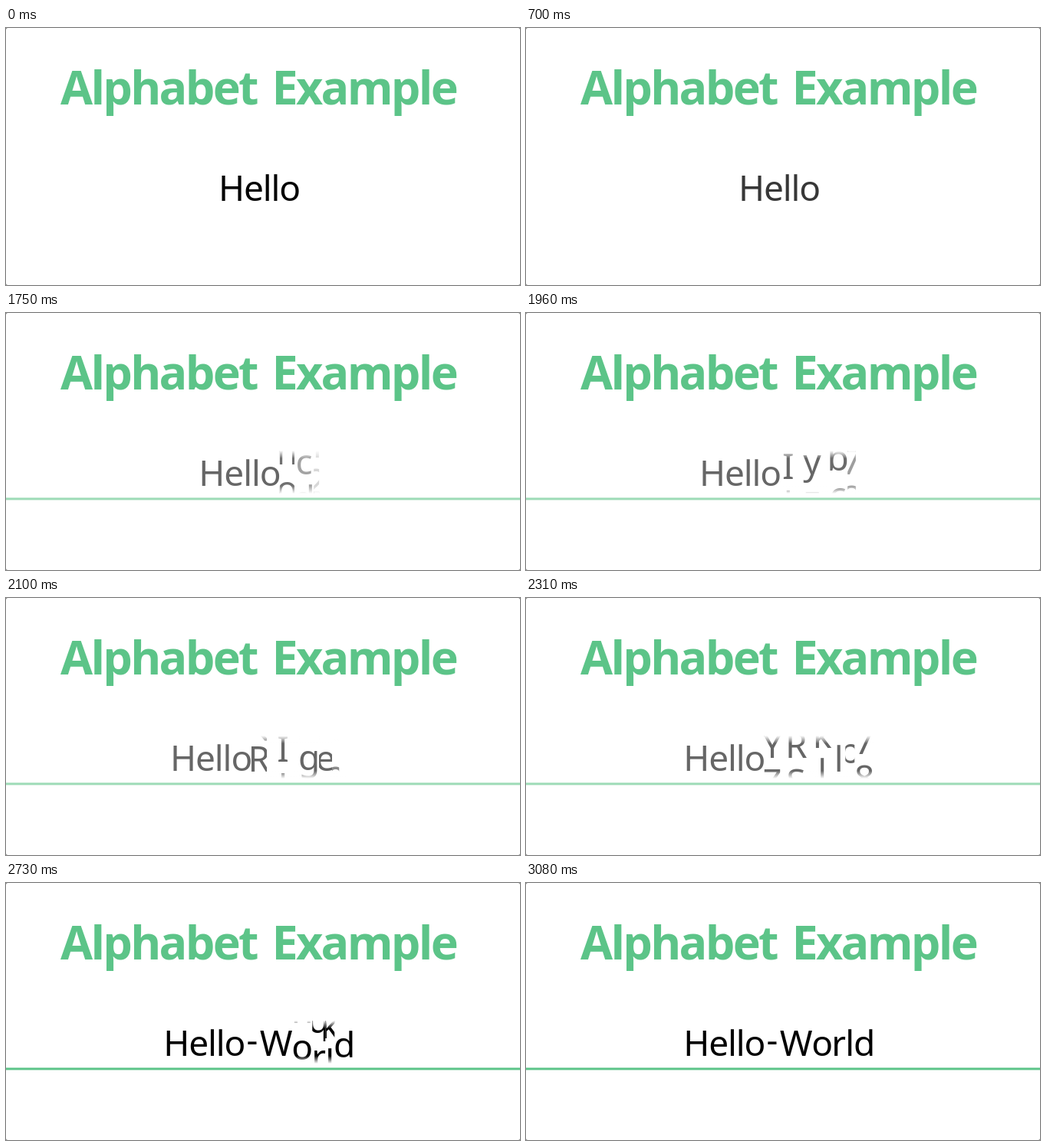
Animation of 670x336 px, one loop 4.34 s. Source, as an HTML page:

```html
<!DOCTYPE html>
<html lang="en">
<head>
<meta charset="utf-8">
<title>Alphabet Example</title>
<style>
  html, body { margin: 0; width: 100%; height: 100%; overflow: hidden; background: #777; }
  svg { display: block; }
  text { font-family: "Noto Sans", "Open Sans", sans-serif; white-space: pre; }
  .title { font-size: 61px; font-weight: 700; letter-spacing: -2.7px; fill: #5cc488; }
  .word { font-size: 46px; }
  #hello { letter-spacing: -1.1px; }
</style>
</head>
<body>
<svg id="stage" width="670" height="336">
  <defs>
    <linearGradient id="fade" x1="0" y1="0" x2="0" y2="1">
      <stop offset="0" stop-color="#fff"/>
      <stop offset=".18" stop-color="#fff" stop-opacity="0"/>
      <stop offset=".82" stop-color="#fff" stop-opacity="0"/>
      <stop offset="1" stop-color="#fff"/>
    </linearGradient>
  </defs>
  <rect width="670" height="336" rx="2.5" fill="#fff"/>
  <text class="title" x="71" y="100">Alphabet</text>
  <text class="title" x="346.5" y="100">Example</text>
  <g id="live">
    <text id="hello" class="word" y="226">Hello</text>
    <g id="reels"></g>
    <rect id="line" y="241.5" width="670" height="3" fill="#5cc488"/>
  </g>
</svg>
<script>
const LOOP = 4340, TICK = 70, BEGIN = 1470;
const TOP = 180, HEIGHT = 56, BASE = 226, PITCH = 48;
const HELLO_X = 277, HELLO_W = 105.5;
const GROW = 300, STAGGER = 100, EASE = 2.8;
const GLYPHS = " 0123456789abcdefghijklmnopqrstuvwxyzABCDEFGHIJKLMNOPQRSTUVWXYZ_-";

// letter, final width, spin start and spin duration in ms
const REELS = [
  ["-", 20.5, 109, 1076],
  ["W", 42, 184, 1100],
  ["o", 26, 231, 1192],
  ["r", 17, 354, 1151],
  ["l", 12, 624, 861],
  ["d", 26, 640, 709]
];

// time from which the live part has this opacity
const DIM = [[0, 1], [700, 0.78], [980, 0.6], [2450, 0.8], [2520, 1]];

const $ = id => document.getElementById(id);
const clamp = v => Math.max(0, Math.min(1, v));

function make(parent, name, attrs) {
  const el = document.createElementNS("http://www.w3.org/2000/svg", name);
  set(el, attrs);
  return parent.appendChild(el);
}

function set(el, attrs) {
  for (const key in attrs) el.setAttribute(key, attrs[key]);
}

const reels = REELS.map(([letter, width, start, spin], i) => {
  const box = make($("reels"), "svg", { y: TOP, height: HEIGHT, overflow: "hidden" });
  const slots = [0, 1].map(() => make(box, "text", { class: "word", "text-anchor": "middle" }));
  make(box, "rect", { width: 60, height: HEIGHT, fill: "url(#fade)" });
  return { box, slots, width, start, spin, delay: i * STAGGER, goal: GLYPHS.indexOf(letter) };
});

function drawReel(reel, x, width, grown, time) {
  set(reel.box, { x, width, opacity: grown, display: grown > 0 ? "inline" : "none" });
  const rest = 1 - clamp((time - reel.start) / reel.spin);
  const pos = reel.goal * (1 - rest ** EASE);
  reel.slots.forEach((slot, i) => {
    const n = Math.floor(pos) + i;
    const glyph = n <= reel.goal ? GLYPHS[n] : "";
    // dashes sit a little higher than the font puts them
    const lift = glyph === "-" || glyph === "_" ? 5 : 0;
    slot.textContent = glyph;
    set(slot, { x: width / 2, y: BASE - TOP - lift + (n - pos) * PITCH });
  });
}

function draw(t) {
  const time = t - BEGIN;
  const grown = reels.map(r => clamp((time - r.delay) / GROW));
  const widths = reels.map((r, i) => r.width * grown[i]);
  const left = HELLO_X - widths.reduce((a, b) => a + b, 0) / 2;
  set($("hello"), { x: left });
  let x = left + HELLO_W;
  reels.forEach((r, i) => {
    drawReel(r, x, widths[i], grown[i], time);
    x += widths[i];
  });
  set($("live"), { opacity: DIM.filter(step => t >= step[0]).pop()[1] });
  set($("line"), { display: t >= 980 ? "inline" : "none" });
}

const origin = performance.now();
function frame() {
  const t = (performance.now() - origin) % LOOP;
  draw(Math.floor(t / TICK) * TICK);
  requestAnimationFrame(frame);
}
frame();
</script>
</body>
</html>
```
